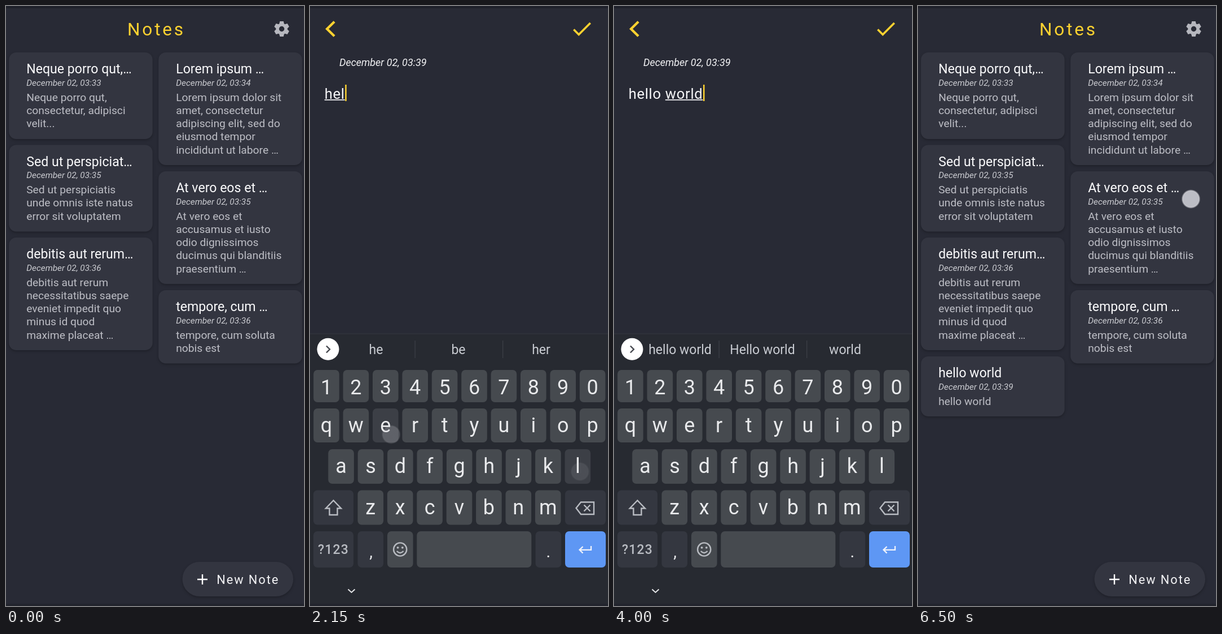
An HTML page that plays this animation: 528x1060 px, repeating every 6550 ms.

```html
<!DOCTYPE html>
<html lang="en">
<head>
<meta charset="utf-8">
<title>Notes</title>
<style>
html, body { margin: 0; width: 100%; height: 100%; overflow: hidden; background: #282a35; }
svg { display: block; width: 100vw; height: 100vh; font-family: Roboto, sans-serif; }
text { white-space: pre; }
.line { fill: none; }
.card rect, .fab rect { filter: drop-shadow(0 2px 2px rgba(0, 0, 0, .25)); }
.card rect { fill: #333540; }
.title { font-size: 23.1px; fill: #fbfbfc; }
.date { font-size: 15.4px; font-style: italic; fill: #cbccd1; }
.body { font-size: 19.26px; fill: #bdbec5; }
.key { fill: #464a4f; }
.dark { fill: #343740; }
.glyph { font-size: 36px; fill: #e9eaec; text-anchor: middle; }
.word { font-size: 23px; fill: #c9ccd2; text-anchor: middle; }
.icon { fill: none; stroke: #b9bcc2; stroke-width: 2.4; }
.tool { fill: none; stroke: #a3a6ac; stroke-width: 2.3; }
</style>
</head>
<body>
<svg id="stage" viewBox="0 0 528 1060"></svg>
<script>
const LOOP = 6550;
const YELLOW = '#fdd230';
const stage = document.getElementById('stage');
const $ = id => document.getElementById(id);

// ---------- markup helpers ----------
const rect = (x, y, w, h, r, attrs = '') =>
  `<rect x="${x}" y="${y}" width="${w}" height="${h}" rx="${r}" ${attrs}/>`;
const text = (x, y, s, attrs = '') => `<text x="${x}" y="${y}" ${attrs}>${s}</text>`;
const path = (d, attrs) => `<path d="${d}" ${attrs}/>`;

function gear(x, y, size, color) {
  let teeth = '';
  for (let a = 0; a < 360; a += 60)
    teeth += path('M-4.6-8L-3.2-13.4H3.2L4.6-8z', `fill="${color}" transform="rotate(${a})"`);
  return `<g transform="translate(${x} ${y}) scale(${size / 27})">${teeth}
    <circle r="7.4" fill="none" stroke="${color}" stroke-width="5.4"/></g>`;
}

function card(x, y, h, title, time, lines, id = '') {
  return `<g class="card" ${id && `id="${id}"`}>
    ${rect(x, y, 254.5, h, 13)}
    ${text(x + 31, y + 37, title, 'class="title"')}
    ${text(x + 31, y + 58.8, 'December 02, ' + time, 'class="date"')}
    ${lines.map((s, i) => text(x + 31, y + 85.6 + 23.27 * i, s, 'class="body"')).join('')}</g>`;
}

// ---------- list page ----------
const L = 5.2, R = 270.2;
const list = `
  ${text(215, 51.7, 'Notes', `font-size="31.6" letter-spacing="3.8" fill="${YELLOW}"`)}
  ${gear(488.5, 40.5, 27, '#b6b7be')}
  ${card(L, 82, 153, 'Neque porro qut,…', '03:33', ['Neque porro qut,', 'consectetur, adipisci', 'velit...'])}
  ${card(L, 245.5, 153, 'Sed ut perspiciat…', '03:35', ['Sed ut perspiciatis', 'unde omnis iste natus', 'error sit voluptatem'])}
  ${card(L, 409, 199, 'debitis aut rerum…', '03:36', ['debitis aut rerum', 'necessitatibus saepe', 'eveniet impedit quo', 'minus id quod', 'maxime placeat …'])}
  ${card(L, 619, 106, 'hello world', '03:39', ['hello world'], 'fresh')}
  ${card(R, 82, 199, 'Lorem ipsum …', '03:34', ['Lorem ipsum dolor sit', 'amet, consectetur', 'adipiscing elit, sed do', 'eiusmod tempor', 'incididunt ut labore …'])}
  ${card(R, 292, 199, 'At vero eos et …', '03:35', ['At vero eos et', 'accusamus et iusto', 'odio dignissimos', 'ducimus qui blanditiis', 'praesentium …'])}
  ${card(R, 502, 129.5, 'tempore, cum …', '03:36', ['tempore, cum soluta', 'nobis est'])}
  <g id="fab" class="fab">
    ${rect(312.5, 982, 196.5, 61, 30.5, 'fill="#333540"')}
    ${path('M339 1013h18M348 1004v18', 'class="line" stroke="#fff" stroke-width="2.4"')}
    ${text(373.2, 1020.6, 'New Note', 'font-size="21.8" letter-spacing="1.93" fill="#f4f4f6"')}
  </g>`;

// ---------- editor page ----------
const TEXT_X = 25.7, TEXT_SIZE = 25.7, TEXT_GAP = .64;
const editor = `<g id="editor">
  ${rect(0, 0, 528, 1060, 0, 'fill="#282a35"')}
  ${path('M43.2 27.8L30.2 40.5L43.2 53.2', `class="line" stroke="${YELLOW}" stroke-width="4.3"`)}
  ${path('M467.3 41.5L476.2 50.4L496.7 29.9', `class="line" stroke="${YELLOW}" stroke-width="3.6"`)}
  ${text(52, 106.2, 'December 02, 03:39', 'font-size="17.98" font-style="italic" fill="#f3f3f5"')}
  ${text(TEXT_X, 163.5, '', `id="typed" font-size="${TEXT_SIZE}" letter-spacing="${TEXT_GAP}" fill="#f6f6f8"`)}
  ${rect(TEXT_X, 165, 0, 1.7, 0, 'id="under" fill="#f0f0f2"')}
  ${rect(0, 139, 2.5, 29, 0, `id="caret" fill="${YELLOW}"`)}
</g>`;

// ---------- keyboard ----------
const STEP = 52.4;
const spots = { ' ': [318, 968] };   // key centres by character

function row(chars, x0, y, h, base) {
  return [...chars].map((c, i) => {
    const x = x0 + STEP * i;
    spots[c] = [x + 22.8, y + h / 2];
    return rect(x.toFixed(1), y, 45.6, h, 7, `class="key" id="key-${c}"`) +
      text((x + 22.8).toFixed(1), base, c, 'class="glyph"');
  }).join('');
}

const bar = x => rect(x, 591, 1.3, 31, 0, 'fill="#3b3e46"');
const toolbar = `<g id="tools">
  ${path('M35 600.5L29 606.5L35 612.5', 'class="line" stroke="#44474d" stroke-width="2.4"')}
  ${path('M95 596.5h16a2 2 0 0 1 2 2v11l-7 7h-11a2 2 0 0 1-2-2v-16a2 2 0 0 1 2-2zM113 609h-5a2 2 0 0 0-2 2v5M98 608q4 5 7 1M99 602.5h2M105 602.5h2', 'class="tool"')}
  ${text(179, 612.5, 'GIF', 'font-size="18" font-weight="900" letter-spacing="1.2" fill="#a3a6ac" text-anchor="middle"')}
  ${gear(256.5, 606.5, 23, '#a3a6ac')}
  ${rect(322, 596, 22, 22, 3, 'fill="#a3a6ac"')}
  ${bar(379.5)}
  ${[418, 427, 436].map(x => `<circle cx="${x}" cy="606.5" r="2.7" fill="#a3a6ac"/>`).join('')}
</g>`;
const words = `<g id="words">
  ${path('M29 600.5L35 606.5L29 612.5', 'class="line" stroke="#44474d" stroke-width="2.4"')}
  ${bar(185.5)}${bar(341)}
  ${[117, 263, 409.5].map((x, i) => text(x, 615.3, '', `class="word" id="word${i}"`)).join('')}
</g>`;
const keyboard = `<g id="keyboard">
  ${rect(0, 579, 528, 600, 0, 'fill="#272a31"')}
  ${rect(0, 578.5, 528, 1.2, 0, 'fill="#33363e"')}
  <circle cx="32" cy="606.3" r="19.5" fill="#fff"/>
  ${toolbar}${words}
  ${row('1234567890', 6.2, 643, 57, 686)}
  ${row('qwertyuiop', 6.2, 711, 60, 752.5)}
  ${row('asdfghjkl', 32.3, 783, 61, 825)}
  ${row('zxcvbnm', 84.5, 855.5, 61, 898)}
  ${[[6, 855.5, 71, 61], [452, 855.5, 72, 61], [6, 928, 71, 64], [84.5, 928, 45.6, 64], [399.6, 928, 45.6, 64]]
    .map(([x, y, w, h]) => rect(x, y, w, h, 7, 'class="dark"')).join('')}
  ${rect(137, 928, 45.6, 64, 7, 'class="key"')}
  ${rect(189.3, 928, 203, 64, 7, 'class="key" id="key- "')}
  ${rect(452, 928, 72, 64, 7, 'fill="#5e97f4"')}
  ${path('M41.5 873.5L28 887.5h6.5v11.5h14v-11.5h6.5z', 'class="icon"')}
  ${path('M471.5 887l8.5-10.5h23v21.5h-23zM485.5 881.5l11 11m0-11l-11 11', 'class="icon"')}
  ${text(41.5, 968, '?123', 'font-size="23" font-weight="500" letter-spacing="1.2" fill="#b9bcc2" text-anchor="middle"')}
  ${text(108, 974, ',', 'class="glyph" style="font-size:29px"')}
  ${text(422.4, 974, '.', 'class="glyph" style="font-size:29px"')}
  <circle cx="159.7" cy="960" r="11.6" class="icon"/>
  <circle cx="155.6" cy="956.8" r="1.9" fill="#b9bcc2"/>
  <circle cx="163.8" cy="956.8" r="1.9" fill="#b9bcc2"/>
  ${path('M153.8 963q5.9 6.4 11.8 0', 'class="icon"')}
  ${path('M498 954v6.8h-20M483.5 955l-6 5.8l6 5.8', 'class="line" stroke="#eef2fb" stroke-width="2.3"')}
  ${path('M67.5 1030.5l6 5.5l6-5.5', 'id="hide" class="line" stroke="#e4e5e8" stroke-width="2"')}
</g>`;

// ---------- typing and touches ----------
const PHRASE = 'hello world';
const PRESS = [1500, 1990, 2145, 2330, 2560, 2760, 2920, 3060, 3190, 3580, 3800];
const HINTS = [
  'h he hi', 'he be her', 'hel help hello', 'hell hello help', 'hello Hello hell',
  'world there everyone', 'w with was', 'wo would work', 'wor world World', 'worl world World'
].map(s => s.split(' ')).concat([['hello world', 'Hello world', 'world']]);

stage.innerHTML = `<defs><radialGradient id="glow">
    <stop offset=".78" stop-color="#d4d5dc" stop-opacity=".85"/>
    <stop offset=".84" stop-color="#f0f0f4" stop-opacity=".8"/>
    <stop offset="1" stop-color="#d4d5dc" stop-opacity="0"/></radialGradient></defs>
  ${rect(0, 0, 528, 1060, 0, 'fill="#282a35"')}
  ${list}${editor}${keyboard}
  ${rect(0, 0, 528, 4, 0, 'fill="#1f212b"')}
  ${rect(0, 1056, 528, 4, 0, 'fill="#22242d"')}
  <g id="touches"></g>`;

const touches = [
  { t: 700, x: 379, y: 997, hold: 155 },
  { t: 4340, x: 491, y: 40, hold: 122 },
  { t: 6400, x: 483.5, y: 341, hold: 999 },
  ...PRESS.map((t, i) => {
    const c = PHRASE[i], [x, y] = spots[c];
    const dx = c === 'e' ? 10 : 4, dy = c === 'e' ? 16 : 9;
    return { t, x: x + dx, y: y + dy, hold: 110, key: $('key-' + c) };
  })
];
$('touches').innerHTML = touches.map(p =>
  `<circle cx="${p.x}" cy="${p.y}" r="17" fill="url(#glow)"/>`).join('');
touches.forEach((p, i) => p.dot = $('touches').children[i]);

const pen = document.createElement('canvas').getContext('2d');
pen.font = `${TEXT_SIZE}px Roboto, sans-serif`;
const textWidth = s => pen.measureText(s).width + s.length * TEXT_GAP;

// ---------- motion ----------
const clamp = v => Math.max(0, Math.min(1, v));
function bezier(x1, y1, x2, y2) {
  const at = (a, b, s) => 3 * (1 - s) * (1 - s) * s * a + 3 * (1 - s) * s * s * b + s * s * s;
  return x => {
    let lo = 0, hi = 1;
    for (let i = 0; i < 24; i++) {
      const mid = (lo + hi) / 2;
      if (at(x1, x2, mid) < x) lo = mid; else hi = mid;
    }
    return at(y1, y2, lo);
  };
}
const slide = bezier(.4, 0, .2, 1);
const fade = bezier(.42, 0, 1, 1);
const show = (id, on) => $(id).setAttribute('visibility', on ? 'inherit' : 'hidden');
const place = (id, dy, alpha) => {
  $(id).setAttribute('transform', `translate(0 ${dy.toFixed(2)})`);
  $(id).setAttribute('opacity', alpha.toFixed(3));
};

const OPEN = 769, CLOSE = 4398;

function drawEditor(t) {
  const k = t < CLOSE ? clamp((t - OPEN) / 300) : clamp(1 - (t - CLOSE) / 300);
  place('editor', 265 * (1 - slide(k)), k ? fade(k) : 0);
  const typed = PHRASE.slice(0, PRESS.filter(p => p <= t).length);
  const start = typed.lastIndexOf(' ') + 1;
  const left = textWidth(typed.slice(0, start)), full = textWidth(typed);
  $('typed').textContent = typed;
  $('under').setAttribute('x', TEXT_X + left);
  $('under').setAttribute('width', t < CLOSE ? full - left : 0);
  $('caret').setAttribute('x', TEXT_X + full + .6);
  show('caret', t < CLOSE);
}

function drawKeyboard(t) {
  const rise = clamp((t - 800) / 200), drop = clamp((t - 4460) / 150);
  const dy = 106 * ((1 - rise) ** 2 + drop ** 2);
  place('keyboard', dy, clamp((t - 800) / 120) * (1 - drop ** 2));
  const hint = PRESS.filter(p => p + 80 <= t).length - 1;
  show('tools', hint < 0);
  show('words', hint >= 0);
  for (let i = 0; i < 3; i++) $('word' + i).textContent = hint < 0 ? '' : HINTS[hint][i];
  show('hide', t >= 1000 && t < CLOSE);
}

function drawTouches(t) {
  const down = new Set();
  for (const p of touches) {
    const d = t - p.t;
    const level = clamp(Math.min(d / 50, (p.hold + 70 - d) / 70));
    p.dot.setAttribute('opacity', level.toFixed(3));
    if (p.key && level > 0) down.add(p.key);
  }
  for (const p of touches) if (p.key) p.key.style.fill = down.has(p.key) ? '#3c3f46' : '';
}

function frame() {
  const t = performance.now() % LOOP;
  drawEditor(t);
  drawKeyboard(t);
  drawTouches(t);
  show('fresh', t >= CLOSE);
  place('fab', t >= 830 && t < CLOSE ? -486 : 0, 1);
  requestAnimationFrame(frame);
}
frame();
</script>
</body>
</html>
```
